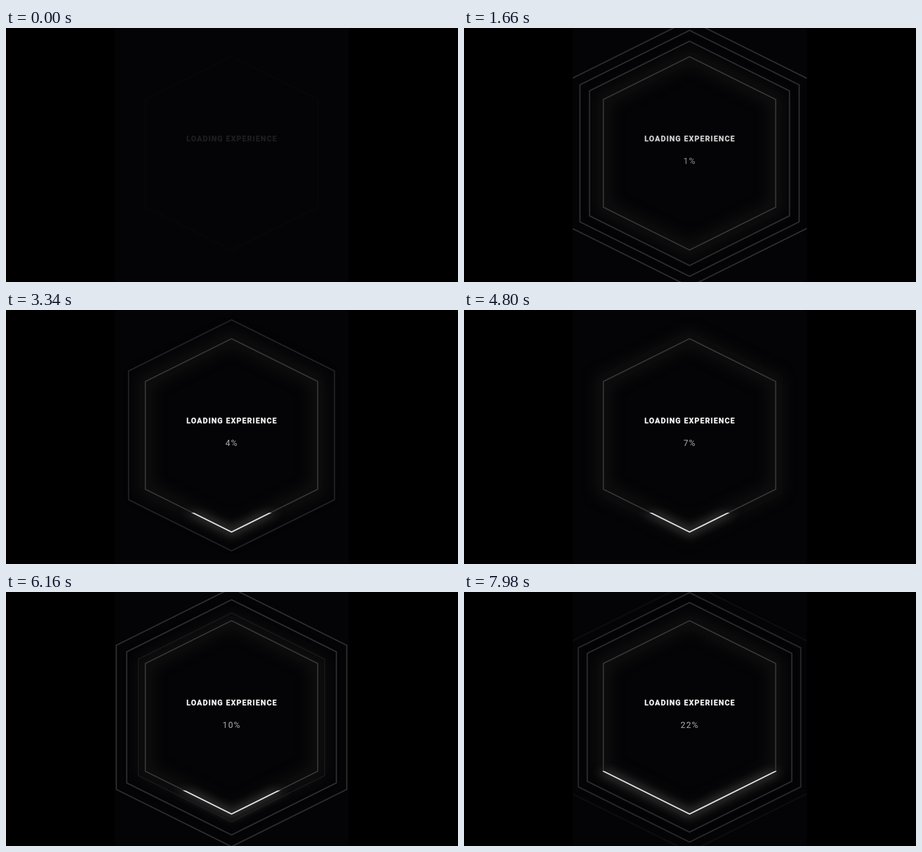
An HTML page for the animation above (8 s loop, 960 px wide and 540 px high).

```html
<!DOCTYPE html>
<html lang="en">
<head>
<meta charset="utf-8">
<title>Loading</title>
<style>
  html, body { margin: 0; width: 100%; height: 100%; overflow: hidden; background: #000; }
  svg { display: block; width: 100vw; height: 100vh; }
  text { font-family: Roboto, sans-serif; text-anchor: middle; letter-spacing: .1em; }
  .title { font-size: 16px; font-weight: 700; fill: #fff; }
  .halo { fill: #666; }
  .count { font-size: 18px; fill: #adadad; }
  .line { fill: none; stroke-linejoin: miter; }
  filter { color-interpolation-filters: sRGB; }
</style>
</head>
<body>
<svg viewBox="0 0 960 540">
  <defs>
    <clipPath id="panel"><rect x="231" y="0" width="497" height="540"/></clipPath>
    <clipPath id="level"><rect id="levelBox" x="231" width="497" height="200"/></clipPath>
    <filter id="soft" filterUnits="userSpaceOnUse" x="200" y="0" width="560" height="540"><feGaussianBlur stdDeviation="14"/></filter>
    <filter id="near" filterUnits="userSpaceOnUse" x="200" y="0" width="560" height="540"><feGaussianBlur stdDeviation="9"/></filter>
    <filter id="halo" filterUnits="userSpaceOnUse" x="340" y="200" width="280" height="70"><feGaussianBlur stdDeviation="1.4"/></filter>
  </defs>
  <g clip-path="url(#panel)">
    <rect x="231" width="497" height="540" fill="#040305"/>
    <g id="frame">
      <path class="line hex" stroke="#101010" stroke-width="30" filter="url(#soft)"/>
      <g id="rings"></g>
      <path class="line hex" stroke="#373737" stroke-width="2.4"/>
    </g>
    <g filter="url(#near)">
      <path class="line hex" stroke="#303030" stroke-width="16" clip-path="url(#level)"/>
    </g>
    <path class="line hex" stroke="#d8d8d8" stroke-width="2.8" clip-path="url(#level)"/>
    <g id="title">
      <text class="title halo" x="479.8" y="241" filter="url(#halo)">LOADING EXPERIENCE</text>
      <text class="title" x="479.8" y="241">LOADING EXPERIENCE</text>
    </g>
    <text id="count" class="count" x="479.4" y="289"></text>
  </g>
</svg>
<script>
const LOOP = 8000;
const CX = 479, CY = 266.5, HALF_W = 183, HALF_H = 205.5, SIDE = 114.5;
const RING_PERIOD = 5400, RING_START = 4640, RING_RATE = 0.00122;
const RINGS = [
  { delay: 0, grow: 0.4 },
  { delay: 470, grow: 0.3 },
  { delay: 1100, grow: 0.2 }
];
const COUNT = [[1000, 0], [1660, 1.1], [3340, 4.2], [4800, 7.2], [5500, 8.4], [6760, 12.4], [7980, 22.4]];
const LEVEL = [[1700, 0], [2500, 10], [5700, 10], [6760, 15.1], [7980, 22.3]];

const $ = id => document.getElementById(id);
const clamp = v => Math.max(0, Math.min(1, v));
const mod = (a, n) => ((a % n) + n) % n;

function hexPath(s) {
  const l = CX - HALF_W * s, r = CX + HALF_W * s;
  const a = CY - SIDE * s, b = CY + SIDE * s;
  return `M${CX} ${CY - HALF_H * s}L${r} ${a}V${b}L${CX} ${CY + HALF_H * s}L${l} ${b}V${a}Z`;
}

function track(keys, t) {
  if (t <= keys[0][0]) return keys[0][1];
  for (let i = 1; i < keys.length; i++) {
    const [t0, v0] = keys[i - 1], [t1, v1] = keys[i];
    if (t < t1) return v0 + (v1 - v0) * (t - t0) / (t1 - t0);
  }
  return keys[keys.length - 1][1];
}

document.querySelectorAll('.hex').forEach(p => p.setAttribute('d', hexPath(1)));
for (const ring of RINGS) {
  ring.el = document.createElementNS('http://www.w3.org/2000/svg', 'path');
  ring.el.setAttribute('class', 'line');
  ring.el.setAttribute('stroke', '#2b2a2c');
  ring.el.setAttribute('stroke-width', 2.8);
  $('rings').append(ring.el);
}

function drawRing({ el, delay, grow }, t) {
  const age = mod(t - RING_START - delay, RING_PERIOD);
  el.setAttribute('d', hexPath(1 + grow * (1 - Math.exp(-RING_RATE * age))));
  el.style.opacity = clamp((age - 100) / 800) * clamp((3550 - age) / 750);
}

function render(t) {
  RINGS.forEach(r => drawRing(r, t));
  $('frame').style.opacity = clamp(0.06 + t / 1300);
  $('title').style.opacity = clamp(0.1 + t / 2250);
  $('count').style.opacity = clamp((t - 300) / 1600);
  $('count').textContent = Math.floor(track(COUNT, t)) + '%';
  const level = track(LEVEL, t);
  $('levelBox').setAttribute('y', level > 0 ? CY + HALF_H - 2 * HALF_H * level / 100 : 540);
}

const begin = performance.now();
function tick() {
  render((performance.now() - begin) % LOOP);
  requestAnimationFrame(tick);
}
render(0);
requestAnimationFrame(tick);
</script>
</body>
</html>
```
